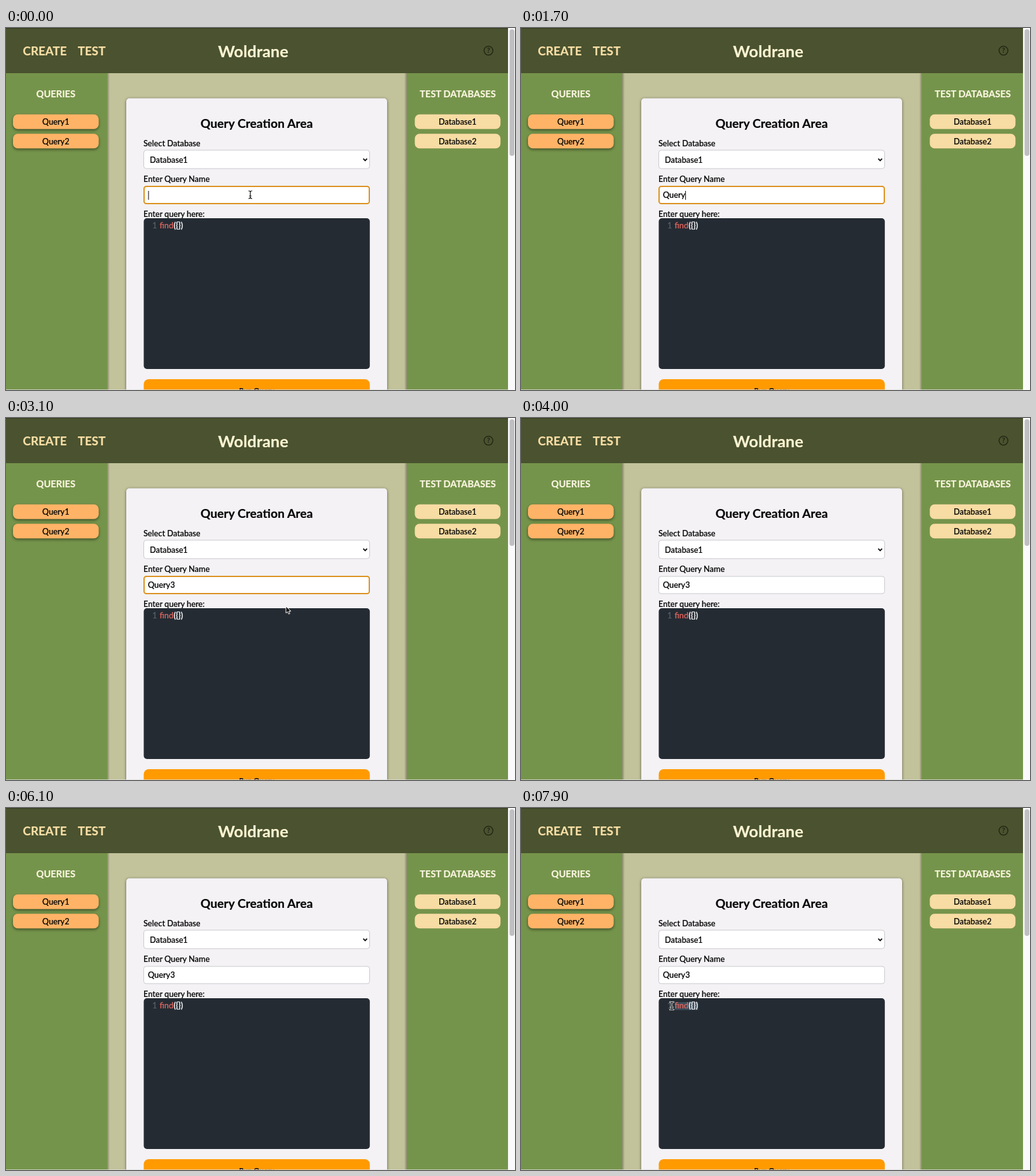
An HTML page that plays this animation: 800 by 569 pixels, repeating every 8000 ms.

```html
<!DOCTYPE html>
<html lang="en">
<head>
<meta charset="utf-8">
<title>Query creation</title>
<style>
html, body { margin: 0; width: 100%; height: 100%; overflow: hidden; }
svg { display: block; width: 800px; height: 569px; }
text {
  font: 500 12.7px Lato, sans-serif; white-space: pre;
  color: #050505; fill: currentColor; stroke: currentColor; stroke-width: .2px;
}
.mid { text-anchor: middle; }
.bold { font-weight: 700; }
.nav { font-size: 18.8px; color: #f9dfa6; }
.side { font-size: 14.7px; color: #fcf7e2; }
.query { fill: #ffb366; filter: drop-shadow(0 2px 2px #0007); }
.db { fill: #f7dca3; }
</style>
</head>
<body>
<svg viewBox="0 0 800 569">
  <defs>
    <linearGradient id="edge">
      <stop offset="0" stop-color="#4a4038" stop-opacity=".45"/>
      <stop offset="1" stop-color="#4a4038" stop-opacity="0"/>
    </linearGradient>
    <path id="beamShape" d="M-2.5-6Q0-6 0-4Q0-6 2.5-6M0-4V4M-2.5 6Q0 6 0 4Q0 6 2.5 6M-1.3 2H1.3"/>
  </defs>

  <rect width="800" height="569" fill="#75944b"/>
  <rect x="159" y="71" width="471" height="498" fill="#c2c29b"/>
  <rect id="shade" x="159" y="71" width="4" height="498" fill="url(#edge)"/>
  <use href="#shade" transform="translate(789) scale(-1 1)"/>

  <rect width="789" height="71" fill="#4a522f"/>
  <rect width="789" height="1" fill="#353c22"/>
  <text class="bold nav" x="26.5" y="43">CREATE</text>
  <text class="bold nav" x="112.8" y="43">TEST</text>
  <text class="bold mid" x="388.5" y="45.5" style="font-size:25.4px;color:#fdf5d3">Woldrane</text>
  <circle cx="758.3" cy="35.6" r="7" fill="none" stroke="#1d2212" stroke-width="1.3"/>
  <text class="mid" x="758.3" y="39.4" style="font-size:10.5px;color:#1d2212">?</text>

  <text class="bold side mid" x="78.3" y="108.9">QUERIES</text>
  <text class="bold side mid" x="710" y="108.9">TEST DATABASES</text>
  <g id="lists"></g>

  <rect x="189" y="110.5" width="410" height="470" rx="5" fill="#f4f2f5" style="filter:drop-shadow(0 1px 2px #0008)"/>
  <text class="bold mid" x="394" y="156.7" style="font-size:19.3px">Query Creation Area</text>
  <text x="216" y="185.5">Select Database</text>
  <rect x="216.5" y="192" width="355" height="29" rx="4" fill="#fff" stroke="#cacacf"/>
  <text x="226" y="211.5">Database1</text>
  <path d="M561.5 205.3l3 3 3-3" fill="none" stroke="#111" stroke-width="1.9"/>
  <text x="216" y="242.2">Enter Query Name</text>
  <rect id="field" y="249" height="27" rx="3.5" fill="#fff"/>
  <text id="name" x="223" y="267.3"></text>
  <rect id="caret" y="256" width="1" height="14" fill="#000"/>
  <text x="216" y="297.4">Enter query here:</text>

  <rect x="216.5" y="299" width="355.3" height="237" rx="5" fill="#242b33"/>
  <rect id="mark" y="305" height="12.5" fill="#3b4d5a"/>
  <text x="230" y="315.3" style="color:#56616b">1</text>
  <text x="241.5" y="315.3" style="color:#e0665f">find</text>
  <text class="bold" x="263.6" y="315.3" style="color:#f3f5f6;font-size:12.5px">({})</text>

  <rect x="216.5" y="552" width="355.3" height="30" rx="8" fill="#ff9a00"/>
  <text class="bold mid" x="394" y="574.4" style="font-size:11.6px">Run Query</text>

  <rect y="568" width="800" height="1" fill="#e2e2de" opacity=".75"/>
  <rect x="789" width="11" height="569" fill="#faf9fb"/>
  <rect x="791.5" y="2" width="7.5" height="199" rx="3.75" fill="#bfbfc1"/>

  <path id="arrow" d="M0 0V10.6L2.5 8.4 4.2 12.2 6.1 11.4 4.5 7.7H7.8Z" fill="#000" stroke="#fff"/>
  <g id="beam" fill="none" stroke-linecap="round">
    <use href="#beamShape" stroke="#fff" stroke-width="2.6"/>
    <use href="#beamShape" stroke="#111" stroke-width="1.2"/>
  </g>
</svg>
<script>
const $ = id => document.getElementById(id);
const set = (el, attrs) => { for (const k in attrs) el.setAttribute(k, attrs[k]); };
const show = (el, on) => { el.style.display = on ? '' : 'none'; };

const button = (kind, x, y, label) =>
  `<rect class="${kind}" x="${x}" y="${y}" width="134.7" height="23" rx="7.5"/>
   <text class="mid" x="${x + 67.3}" y="${y + 16.3}">${label}</text>`;
$('lists').innerHTML = [1, 2].map(n => {
  const y = 105.2 + 30.5 * n;
  return button('query', 11, y, 'Query' + n) + button('db', 642.5, y, 'Database' + n);
}).join('');

const word = 'Query3';
const keys = [900, 1100, 1300, 1400, 1600, 2200];

// Pointer trips: [time, x, y] stops; the pointer is hidden between trips.
const trips = [
  [[0, 384, 262], [900, 384, 262]],
  [[2700, 384, 262], [3100, 440, 296], [3500, 428, 345], [3900, 428, 345]],
  [[6300, 330, 262], [6600, 330, 262], [7000, 296, 324], [7300, 280, 311], [7500, 279, 311], [7900, 237, 311], [8000, 237, 311]]
];

function pointerAt(t) {
  const trip = trips.find(s => t >= s[0][0] && t < s[s.length - 1][0]);
  if (!trip) return null;
  const i = trip.findIndex(s => s[0] > t);
  const [a, b] = [trip[i - 1], trip[i]];
  const u = (t - a[0]) / (b[0] - a[0]);
  const e = u * u * (3 - 2 * u);
  return [a[1] + (b[1] - a[1]) * e, a[2] + (b[2] - a[2]) * e];
}

function draw(t) {
  const typed = keys.filter(k => k <= t).length;
  const focused = t < 3600 || (t >= 6500 && t < 7500);
  set($('field'), focused
    ? { x: 217, width: 354, stroke: '#dc9322', 'stroke-width': 2 }
    : { x: 216.5, width: 355, stroke: '#cacacf', 'stroke-width': 1 });
  $('name').textContent = word.slice(0, typed);

  const since = t >= 6500 ? t - 6500 : t - Math.max(0, ...keys.filter(k => k <= t));
  set($('caret'), { x: typed ? 223 + $('name').getComputedTextLength() : 223.5 });
  show($('caret'), focused && since % 1000 < 600);

  const p = pointerAt(t);
  const inField = p && p[1] > 249 && p[1] < 276;
  const inCode = p && p[1] > 304 && p[1] < 318;
  show($('arrow'), p && !inField && !inCode);
  show($('beam'), inField || inCode);
  if (p) for (const id of ['arrow', 'beam']) set($(id), { transform: `translate(${p})` });

  const left = p && t >= 7500 ? Math.max(241.5, p[0]) : 278.5;
  set($('mark'), { x: left, width: Math.max(0, 278.5 - left) });
}

function tick() {
  draw(Math.floor(performance.now() % 8000 / 100) * 100);
  requestAnimationFrame(tick);
}
tick();
</script>
</body>
</html>
```
